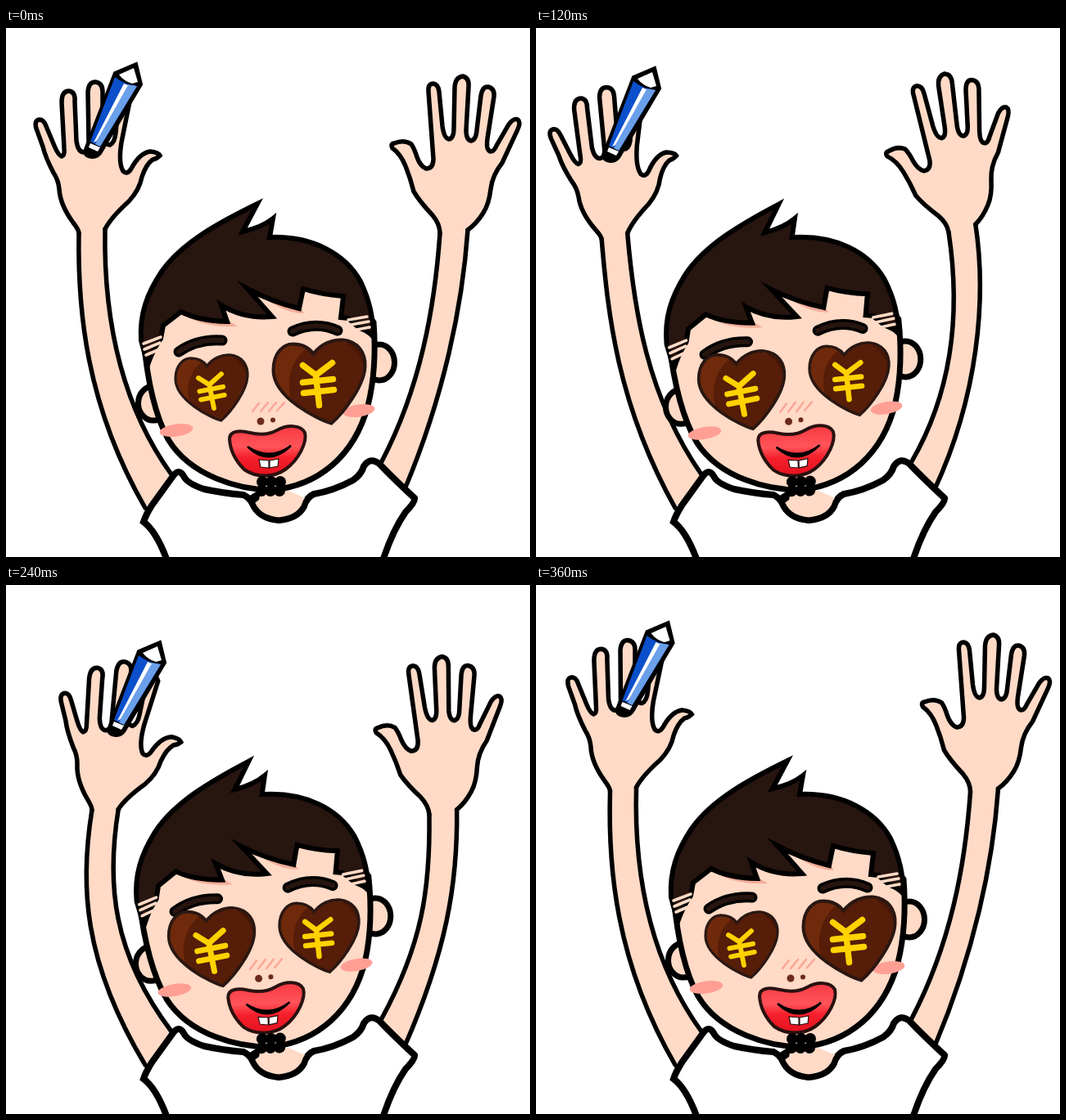
These frames come from a looping animation (640x647 px, 400 ms). An HTML page with a canvas:

```html
<!DOCTYPE html>
<html lang="en">
<head>
<meta charset="utf-8">
<title>Money eyes</title>
<style>
  html, body { margin: 0; width: 100%; height: 100%; overflow: hidden; background: #fff; }
  canvas { display: block; }
</style>
</head>
<body>
<canvas id="stage" width="640" height="647"></canvas>
<script>
const ctx = document.getElementById('stage').getContext('2d');
const SKIN = '#ffdac6', INK = '#000', HAIR = '#27150f', PINK = '#ff9f94';
const STEP = 40, STEPS = 10;
const rad = deg => deg * Math.PI / 180;

function shape(d, fill, stroke, width = 6) {
  const path = d instanceof Path2D ? d : new Path2D(d);
  if (fill) { ctx.fillStyle = fill; ctx.fill(path); }
  if (stroke) { ctx.strokeStyle = stroke; ctx.lineWidth = width; ctx.stroke(path); }
}

function oval(x, y, rx, ry, turn, fill, stroke, width) {
  const path = new Path2D();
  path.ellipse(x, y, rx, ry, rad(turn), 0, Math.PI * 2);
  shape(path, fill, stroke, width);
}

// Each arm: the hand's rest pose, its track of [x, y, degrees] per step, and the two fixed arm edges.
const leftArm = {
  track: [[113.5, 135, 0], [105.5, 130.5, -2], [98, 133, -4], [95.5, 141, -4.5], [104, 155, -2.5],
          [119.5, 166, 1], [142, 163, 6.3], [151.5, 155.5, 8.5], [136, 145, 5], [116, 136.5, .5]],
  lean: 1,
  edges: [
    { wrist: [89, 251], bend: [97, 460], end: [170, 587] },
    { wrist: [121, 246], bend: [133, 450], end: [202, 546] }
  ],
  hand: new Path2D(`M89 251Q89 247 82 238Q66 216 65 197Q64 186 58 177Q48 158 45 145L37 123
    Q34 113 41 112Q46 112 49 120L59 144Q64 156 68 157Q72 156 71 147L68 91Q68 77 77 77Q85 78 84 90
    L86 138Q88 152 95 152Q102 151 101 138L100 78Q101 66 109 66Q118 67 118 78L118 130Q121 143 127 143
    Q133 140 134 128L138 85Q145 70 152 85L141 140Q137 165 143 175Q148 180 153 172Q163 153 176 151
    Q186 152 188 156Q184 160 179 161Q171 167 166 182Q163 198 150 212Q128 232 121 246`)
};

const rightArm = {
  track: [[548.5, 128, 0], [531.5, 121.5, -4.3], [514, 120, -7.5], [501.5, 125.5, -9.7], [499, 138, -9.6],
          [505.5, 150, -7.7], [527.5, 157, -3.7], [550, 159.5, 2.7], [556, 146, 2.5], [549, 130, 0]],
  lean: 4,
  edges: [
    { wrist: [530, 251], bend: [506, 440], end: [459, 530] },
    { wrist: [564, 247], bend: [535, 450], end: [487, 564] }
  ],
  hand: new Path2D(`M530 251Q530 240 521 229Q505 212 498 200Q494 184 488 169Q482 154 472 147
    Q469 142 474 141Q486 136 495 142Q499 148 502 158Q506 169 513 172Q522 172 522 160L516 78
    Q515 68 522 68Q528 69 529 78L533 120Q535 135 541 136Q547 135 547 122L548 72Q549 60 558 59
    Q566 61 565 72L562 125Q562 137 568 138Q574 137 575 125L580 83Q582 71 589 72Q597 74 596 84
    L588 135Q586 150 592 151Q596 151 599 144L614 118Q620 110 625 112Q629 115 625 124L606 165
    Q594 180 592 197Q590 215 583 226Q575 239 564 247`)
};

const penTrack = [[0, 0], [-7, -5], [-13, -2], [-14, 5], [-7, 17], [5, 28], [29, 26], [43, 22], [25, 11], [2.5, 2]];

function drawArm(arm, step) {
  const [x0, y0] = arm.track[0];
  const [x, y, turn] = arm.track[step];
  const pose = new DOMMatrix().translate(x, y).rotate(turn).translate(-x0, -y0);
  const lean = rad(arm.lean + 1.3 * turn);
  const [a, b] = arm.edges.map(({ wrist, bend, end }) => {
    const w = pose.transformPoint({ x: wrist[0], y: wrist[1] });
    return {
      wrist: [w.x, w.y], end,
      near: [w.x - 92 * Math.sin(lean), w.y + 92 * Math.cos(lean)],
      far: [bend[0] - .5 * turn, bend[1]]
    };
  });
  const limb = new Path2D(`M${a.end}C${a.far} ${a.near} ${a.wrist}L${b.wrist}C${b.near} ${b.far} ${b.end}`);
  const lines = new Path2D(`M${a.end}C${a.far} ${a.near} ${a.wrist}M${b.wrist}C${b.near} ${b.far} ${b.end}`);
  const hand = new Path2D();
  hand.addPath(arm.hand, pose);
  shape(limb, SKIN, SKIN, 2);
  shape(hand, SKIN);
  shape(lines, null, INK, 5.5);
  shape(hand, null, INK, 5.5);
}

function drawPen([dx, dy]) {
  ctx.save();
  ctx.translate(dx, dy);
  shape('M133 55L159 44L165 69L117 150Q113 158 105 158Q96 157 96 151Z', INK, INK, 4);
  shape('M133 60Q146 70 160 71L115 145L103 139Z', '#0b4fcb');
  shape('M149 69L160 71L115 145L109 142Z', '#6a9fea');
  shape('M144 68L149 70L111 138L107 140Z', '#fff');
  shape('M103 141L115 146L112 151L101 146Z', '#fff');
  shape('M138 57L156 49L161 66L154 68Q144 65 138 57Z', '#fff');
  ctx.restore();
}

function drawBody() {
  const neck = 'Q298 575 301 582Q309 600 333 602Q356 600 364 585Q367 574 376 570';
  shape(`M197 652Q184 616 168 604Q171 595 178 584L204 548Q211 538 217 548Q221 557 242 564
    Q265 569 290 571${neck}Q400 566 424 553Q434 546 437 536Q445 524 456 533Q470 548 499 575
    Q500 580 488 592Q472 615 460 652`, '#fff', INK, 8);
  shape('M301 580Q309 600 333 602Q356 600 364 585L368 576L345 566L310 566Z', SKIN);
  shape(`M290 571${neck}`, null, INK, 7);
  shape('M296 573L312 563L309 577L301 583Z', INK);
}

const heart = new Path2D(`M15 51C0 47 -56 20 -56 -14C-56 -35 -44 -46 -32 -46C-20 -46 -12 -41 -7 -34
  C2 -46 16 -52 29 -51C48 -49 57 -35 56 -18C55 5 30 38 15 51Z`);

function drawEye(x, y, scale, yenTurn) {
  ctx.save();
  ctx.translate(x, y);
  ctx.scale(scale, scale);
  shape(heart, '#471706');
  ctx.save();
  ctx.clip(heart);
  oval(-16, -14, 58, 60, 20, '#6f2a0b');
  oval(10, 0, 46, 52, 20, '#561d08');
  ctx.restore();
  shape(heart, null, '#2a1712', 4);
  ctx.rotate(rad(yenTurn));
  if (yenTurn) ctx.translate(1, 3);
  shape('M-20 -20L-4 -8L16 -23M-4 -8L0 29M-20 1L17 -3M-19 14L18 10', null, '#ffd200', 7.5);
  ctx.restore();
}

function drawMouth() {
  const red = ctx.createLinearGradient(0, 488, 0, 548);
  red.addColorStop(0, '#f83a42');
  red.addColorStop(.4, '#ff5459');
  red.addColorStop(.62, '#f5202c');
  red.addColorStop(1, '#e5111f');
  shape(`M273 503C273 492 286 492 298 495C311 498 322 497 331 492C343 485 360 485 365 495
    C368 506 358 528 341 540C327 550 305 550 291 540C281 530 274 517 273 503Z`, red, '#2a1110', 4);
  shape('M309 528L321 529L321 538L311 537ZM322 529L333 527L332 536L322 538Z', '#fff', '#2a1110', 1.2);
  shape('M295 512Q321 537 348 511Q322 530 295 512Z', INK, INK, 2.5);
}

function drawHead(p) {
  ctx.save();
  ctx.translate(320, 560);
  ctx.rotate(rad(-2.35 * p));
  ctx.translate(-320, -560);

  oval(456, 409, 18.5, 22, 0, SKIN, INK, 7);
  oval(180, 459, 18.5, 21, 0, SKIN, INK, 7);
  shape(`M168 380C172 425 180 470 198 503C225 548 285 565 325 565C380 560 425 525 442 462
    C450 430 452 400 449 360L400 290L220 290Z`, SKIN, INK, 7);

  shape('M214 347Q235 367 283 365L270 357ZM290 352Q315 361 327 352ZM316 330Q340 349 364 349L358 340Z', '#f3ad99');
  shape(`M173 412L165 382C163 350 172 325 190 298C215 262 262 237 307 215L289 249Q312 244 326 233
    L322 256C375 254 415 277 433 310C445 335 448 355 449 378Q443 371 432 367L418 355L409 354L412 328
    Q385 326 363 319L358 343Q325 335 295 319L325 353Q290 356 263 339L270 359Q235 358 214 347
    L192 364L189 380Q180 392 173 412Z`, HAIR, INK, 6);
  shape(`M168 386L189 378M169 393L188 385M171 400L185 394
    M418 357L441 353M421 363L443 359M428 369L444 366`, null, SKIN, 3.6);

  const brows = 'M211 396Q234 380 264 382M350 371Q378 358 405 370';
  shape(brows, null, INK, 13);
  shape(brows, null, HAIR, 6);

  oval(208, 492, 20.5, 7.5, -8, PINK);
  oval(431, 468, 19.5, 7.5, -8, PINK);
  shape('M301 469L309 459M311 469L320 458M321 469L330 458M331 468L340 458', null, '#fba696', 2.5);
  oval(311, 481, 4.5, 4.5, 0, '#6b2c1c');
  oval(326, 479.5, 3, 3, 0, '#6b2c1c');
  drawMouth();
  for (const x of [313, 324, 335]) {
    oval(x, 555, 7, 7, 0, INK);
    oval(x - 1, 566, 7, 7, 0, INK);
  }
  ctx.restore();

  // The eyes pulse in place and do not tilt with the head.
  drawEye(251, 440 + 3.5 * p, .786 + .197 * p, -5);
  drawEye(382.5, 432.5 - 4.5 * p, 1 - .18 * p, 0);
}

function draw(now) {
  const step = Math.floor(now / STEP) % STEPS;
  const sway = (1 - Math.cos(rad(step * 40))) / 2;
  ctx.fillStyle = '#fff';
  ctx.fillRect(0, 0, 640, 647);
  ctx.lineCap = 'round';
  ctx.lineJoin = 'miter';
  drawArm(leftArm, step);
  drawArm(rightArm, step);
  drawPen(penTrack[step]);
  drawBody();
  drawHead(sway);
}

let start;
function tick(now) {
  start ??= now;
  draw(Math.max(0, now - start));
  requestAnimationFrame(tick);
}
draw(0);
requestAnimationFrame(tick);
</script>
</body>
</html>
```
